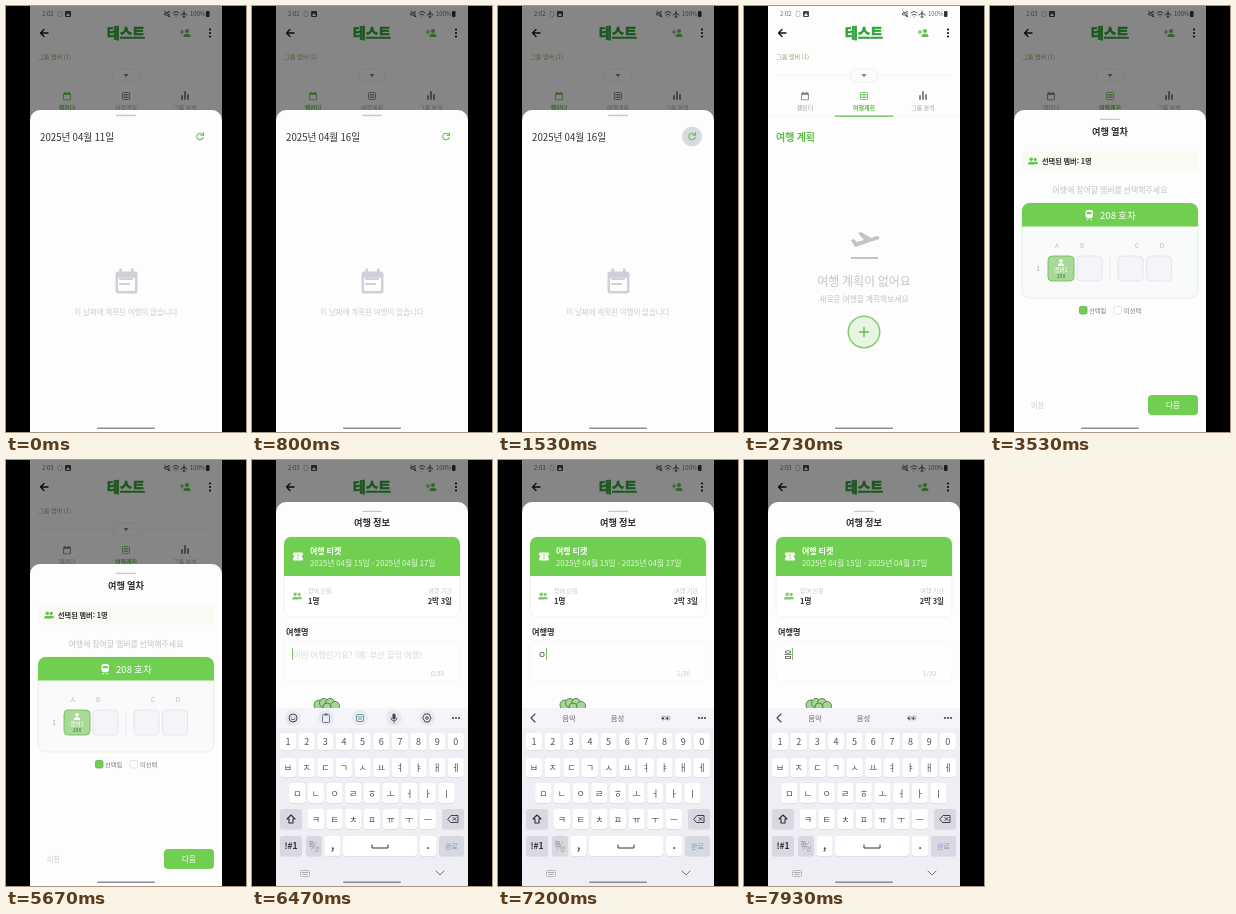
These frames come from a looping animation (240x426 px, 8 s). An HTML page with a canvas:

```html
<!DOCTYPE html>
<html lang="ko">
<head>
<meta charset="utf-8">
<style>
html, body { margin: 0; width: 100%; height: 100%; overflow: hidden; background: #000; }
canvas { display: block; width: 240px; height: 426px; }
</style>
</head>
<body>
<canvas id="stage"></canvas>
<script>
const canvas = document.getElementById('stage');
const scale = window.devicePixelRatio || 1;
canvas.width = 240 * scale;
canvas.height = 426 * scale;
const c = canvas.getContext('2d');
const FONT = '"Noto Sans CJK KR", "Noto Sans KR", "Noto Sans", sans-serif';
const GREEN = '#70cf50', INK = '#303030', PALE = '#c5c5cb', PAPER = '#fdfdfd';

const clamp = x => Math.max(0, Math.min(1, x));
const ease = (t, from, to) => 1 - (1 - clamp((t - from) / (to - from))) ** 3;

function text(s, x, y, size, color = INK, align = 'left', weight = 400) {
  c.font = `${weight} ${size}px ${FONT}`;
  c.textAlign = align;
  c.textBaseline = 'middle';
  c.fillStyle = color;
  c.fillText(s, x, y + .5);
}
function box(x, y, w, h, r, fill, stroke, dash = []) {
  c.beginPath();
  c.roundRect(x, y, w, h, r);
  if (fill) { c.fillStyle = fill; c.fill(); }
  if (stroke) {
    c.strokeStyle = stroke; c.lineWidth = .8;
    c.setLineDash(dash); c.stroke(); c.setLineDash([]);
  }
}
function disc(x, y, r, fill, stroke, width = 1) {
  c.beginPath();
  c.arc(x, y, r, 0, 7);
  if (fill) { c.fillStyle = fill; c.fill(); }
  if (stroke) { c.strokeStyle = stroke; c.lineWidth = width; c.stroke(); }
}
// Icon outline drawn relative to its centre.
function icon(x, y, d, color, width = 1, fill = false) {
  c.save();
  c.translate(x, y);
  const path = new Path2D(d);
  c.lineWidth = width;
  c.lineJoin = c.lineCap = 'round';
  c.strokeStyle = c.fillStyle = color;
  fill ? c.fill(path) : c.stroke(path);
  c.restore();
}
function person(x, y, k, color) {
  disc(x, y - 2 * k, 2 * k, color);
  box(x - 3.5 * k, y + .8 * k, 7 * k, 3.2 * k, [3 * k, 3 * k, 0, 0], color);
}
function people(x, y, color) {
  person(x + 2.2, y, .8, color);
  person(x - 1.8, y, .9, color);
}
function calendar(x, y, k, color) {
  box(x - 4 * k, y - 3.5 * k, 8 * k, 8 * k, k, color);
  box(x - 3.1 * k, y - 1.2 * k, 6.2 * k, 4.8 * k, .3 * k, PAPER);
  for (const dx of [-2.6, 1.6]) box(x + dx * k, y - 4.5 * k, k, 2 * k, 0, color);
}
const dots = (x, y, dx, dy, color) =>
  [-1, 0, 1].forEach(i => disc(x + i * dx, y + i * dy, 1.1, color));

function drawLogo() {
  text('테스트', 120, 26.5, 13.8, '#2fa336', 'center', 900);
  c.strokeStyle = '#2fa336';
  c.lineWidth = .7;
  c.strokeText('테스트', 120, 27);
}

function drawPage(t) {
  box(24, 0, 192, 426, 0, PAPER);
  text(t < 3000 ? '2:02' : '2:03', 36, 7.5, 6, '#666');
  box(52, 5.5, 4, 5, 1, null, '#777', [1, 1]);
  box(59, 5, 6, 6, 1, '#444');
  icon(62, 8, 'M-2 2L0-1L2 2Z', PAPER, 1, true);
  icon(161, 8, 'M-2-1H0L2-3V3L0 1H-2ZM-2-3L3 3', '#444', .8);
  icon(170, 8, 'M-3-1Q0-4 3-1M-2 1Q0-1 2 1M0 3V3', '#555', 1);
  icon(178, 8, 'M0-3V3M-3 1L0-1L3 1M-1 3H1', '#444', 1);
  text('100%', 184, 7.5, 6, '#666');
  box(200, 5, 3.5, 6, 1, '#333');

  icon(38, 27, 'M4 0H-3.5M0-3.5L-3.5 0L0 3.5', '#111', 1.3);
  drawLogo();
  person(181, 27, 1, '#62bd50');
  icon(176, 27, 'M-2-1H2M0-3V1', '#62bd50', 1.1);
  dots(204, 27, 0, 3.5, '#111');

  text('그룹 멤버 (1)', 32, 50.5, 6.2, '#a3a36c');
  icon(0, 69, 'M34 0H106M134 0H206', '#efeff2', .8);
  box(106.5, 63, 27, 13, 6.5, PAPER, '#e9e9ee');
  icon(120, 69.5, 'M-2.5-1.5H2.5L0 2Z', '#888', 1, true);

  const active = t < 1800 ? 0 : 1;
  const tint = i => i === active ? '#5cbd46' : '#777780';
  calendar(61, 90, .95, tint(0));
  box(116.5, 86.5, 7, 7, 1, null, tint(1));
  icon(120, 90, 'M-2-1.5H2M-2 0H2M-2 1.5H2', tint(1), .8);
  icon(179, 90, 'M-3 3V0M0 3V-4M3 3V-1', tint(2), 1.8);
  ['캘린더', '여행계획', '그룹 분석'].forEach((s, i) =>
    text(s, 61 + i * 59, 101.5, 6, i === active ? tint(i) : '#a0a0a8', 'center', i === active ? 600 : 400));
  box(24, 110.3, 192, .5, 0, '#eeeef0');
  box(32 + active * 59, 109.5, 58, 1.3, .5, '#5cbd46');

  text('여행 계획', 32, 131, 10, '#5cbd46', 'left', 700);
  icon(121, 237, 'M-14-3L-11-4L-8-1L-1-3L-7-10L-4-11L6-5L12-7Q15-7 14-4L-10 4Z', '#c2c2c8', 1, true);
  box(107, 251, 27, 2, 0, '#c2c2c8');
  text('여행 계획이 없어요', 120, 275, 12, '#c4c4cc', 'center');
  text('새로운 여행을 계획해보세요', 120, 293, 7.8, PALE, 'center');
  disc(120, 326, 15.7, t > 2950 && t < 3250 ? '#cbeac2' : '#e8f5e3', '#83cf6c', 1.5);
  icon(120, 326, 'M-4.5 0H4.5M0-4.5V4.5', '#66bd50', 1.4);
}

// Dimmed backdrop with a rounded panel; open runs from 0 to 1.
function sheet(top, open, handleY, content) {
  if (open <= 0) return;
  c.fillStyle = `rgba(0,0,0,${.47 * open})`;
  c.fillRect(24, 0, 192, 426);
  c.save();
  c.translate(0, (426 - top) * (1 - open));
  box(24, top, 192, 426 - top, [10, 10, 0, 0], PAPER);
  box(110, top + handleY, 20, 1.4, .7, '#c8c8c4');
  content();
  c.restore();
}

function drawDate(t) {
  text(`2025년 04월 ${t < 800 ? 11 : 16}일`, 34, 130.5, 9.7, INK, 'left', 500);
  const press = clamp((t - 1380) / 120) * (1 - clamp((t - 1600) / 200));
  if (press) disc(194, 130.5, 10 * press, '#d9d9e0');
  icon(194, 130.5, 'M3-1.5A3.3 3.3 0 1 0 3.2 1M3.5-4V-1.2H.7', '#66c04f', 1.1);
  calendar(120.5, 275, 2.75, '#cfcfda');
  icon(120, 275, 'M-6-2H6M-6 3H3', '#cfcfda', 2);
  text('이 날짜에 계획된 여행이 없습니다', 120, 305.5, 7.5, '#cdcdd4', 'center');
}

function drawTrain(t) {
  text('여행 열차', 120, 125, 9.2, INK, 'center', 600);
  box(32, 145, 176, 20, 5, '#f8fbf4');
  people(43, 155, '#66c04f');
  text('선택된 멤버: 1명', 52, 155, 7.2, INK, 'left', 600);
  text('여행에 참여할 멤버를 선택해주세요', 120, 183, 7.95, '#c2c2cb', 'center');

  box(32, 197, 176, 95, 8, '#f9fbfa', '#dcf0da');
  box(32, 197, 176, 23.5, [8, 8, 0, 0], GREEN);
  box(95.5, 204, 7.5, 8, 2, '#fff');
  box(96.7, 206, 5, 2.3, 0, GREEN);
  icon(99.2, 213, 'M-2.5 1L-1 0M2.5 1L1 0', '#fff', 1);
  text('208 호차', 110, 209, 9.6, '#fff', 'left', 500);
  [67, 92, 147, 172].forEach((x, i) => text('ABCD'[i], x, 239.5, 6.2, '#b9b9c2', 'center'));
  text('1', 48, 262.5, 6.5, '#a5a5ad', 'center');
  icon(120, 263, 'M0-12V12', '#e8e8ee', .8);
  for (const x of [87, 128, 156.5]) box(x, 250, 25, 25, 4, '#f5f5f9', '#e0e0e7');
  box(58, 250, 26, 25, 4, '#a9d998', '#69b852');
  person(71, 256.5, .9, '#fff');
  text('멤버1', 71, 263.5, 5.6, '#fff', 'center', 500);
  text('208', 71, 270, 5, '#476f3b', 'center');

  box(89.5, 300.5, 7.5, 7.5, 1.5, GREEN, '#5fb448');
  text('선택됨', 99, 304, 6.2, '#777');
  box(124, 300.5, 7.5, 7.5, 1.5, '#fff', '#dddde4');
  text('미선택', 134, 304, 6.2, '#777');
  text('이전', 41, 398.5, 7, PALE);
  box(158, 389, 50, 20, 4, t > 5740 && t < 5900 ? '#93db7a' : GREEN);
  text('다음', 183, 398.5, 7.5, '#fff', 'center', 500);
}

const typed = t => t < 7000 ? '' : t < 7300 ? 'ㅇ' : t < 7600 ? '으' : '음';

function drawInfo(t) {
  text('여행 정보', 120, 62, 9.2, INK, 'center', 600);
  box(32, 77, 176, 80, 7, '#fff', '#e7f3e3');
  box(32, 77, 176, 39, [7, 7, 0, 0], GREEN);
  box(41, 92.5, 10, 8, 1, '#fff');
  disc(41, 96.5, 1.3, GREEN);
  disc(51, 96.5, 1.3, GREEN);
  icon(46, 96.5, 'M0-2.5V2.5', GREEN, .8);
  text('여행 티켓', 58, 90, 8, '#fff', 'left', 600);
  text('2025년 04월 15일 - 2025년 04월 17일', 58, 103, 7.8, '#e3f6dc');
  people(45, 136, '#83ca6d');
  text('참여 인원', 56, 130.5, 6.1, PALE);
  text('1명', 56, 140.5, 7.5, INK, 'left', 600);
  text('여행 기간', 200, 130.5, 6.1, PALE, 'right');
  text('2박 3일', 200, 140.5, 7.5, INK, 'right', 600);

  text('여행명', 34, 171.5, 8.2, INK, 'left', 600);
  box(32, 182, 176, 39, 5, '#fefefe', '#ededf1', [2, 2]);
  const word = typed(t);
  if (word) text(word, 40, 194, 8.8, INK);
  else text('어떤 여행인가요? (예: 부산 힐링 여행)', 41, 194, 8.4, '#d8d8de');
  if (word || (t - 6350) % 1000 < 500) box(word ? 48 : 40, 188, .9, 12, 0, '#70b95a');
  text(`${word.length}/30`, 192, 213.5, 6.3, '#c6c6cd', 'right');

  for (const [x, y, r] of [[67, 245, 5], [72, 243, 4.5], [78, 243, 4.5], [83, 246, 4.5], [75, 247, 4]])
    disc(x, y, r, '#a5d695', '#4b7f45', .9);
}

function drawToolbar(word) {
  const ink = '#45454b';
  if (word) {
    icon(35, 258, 'M2-4L-2 0L2 4', ink, 1.1);
    text('음악', 71, 258, 7.3, '#66666e', 'center');
    text('음성', 119.5, 258, 7.3, '#66666e', 'center');
    for (const x of [165.5, 170]) {
      disc(x, 258, 2, '#fff', '#777', .6);
      disc(x - .5, 258.3, 1.1, '#333');
    }
  } else {
    for (const x of [41, 74, 108, 142, 175]) disc(x, 258, 8, '#e9e9f1');
    disc(41, 258, 4, null, ink);
    icon(41, 258, 'M-1.5-1V-1M1.5-1V-1M-2 1Q0 3 2 1', ink, .9);
    box(70.5, 254.5, 7, 8, 1, null, '#55607a');
    box(72.5, 253.5, 3, 2, 0, '#55607a');
    box(104.5, 254.5, 7, 7, 1.5, null, '#438b8b');
    icon(108, 258, 'M-1.5-1H1.5M-1.5 1H1.5', '#438b8b', .8);
    box(140.4, 253.5, 3.2, 6, 1.6, ink);
    icon(142, 258, 'M-3 0Q-3 3 0 3Q3 3 3 0M0 3V5', ink, .8);
    icon(175, 258, 'M-2-4H2L4 0L2 4H-2L-4 0Z', ink);
    disc(175, 258, 1.3, null, ink);
  }
  dots(204, 258, 3, 0, ink);
}

function drawKeyboard(t) {
  const open = ease(t, 6120, 6380);
  if (!open) return;
  c.save();
  c.translate(0, 178 * (1 - open));
  box(24, 248, 192, 20, 0, '#f5f5f9');
  box(24, 268, 192, 158, 0, '#eeeef4');
  drawToolbar(typed(t));

  const strokes = { 'ㅇ': 7000, 'ㅡ': 7300, 'ㅁ': 7600 };
  const key = (x, y, w, h, fill = '#fff') => {
    box(x, y + .8, w, h, 3, '#d9d9e2');
    box(x, y, w, h, 3, fill);
  };
  const row = (letters, x, y, h) => [...letters].forEach((s, i) => {
    const cx = x + i * 18.65;
    const held = t >= strokes[s] - 60 && t < strokes[s] + 90;
    key(cx - 8, y, 16, h, held ? '#cfcfda' : '#fff');
    text(s, cx, y + h / 2, 9, '#505058', 'center');
  });
  row('1234567890', 36, 273, 17);
  row('ㅂㅈㄷㄱㅅㅛㅕㅑㅐㅔ', 36, 298, 19);
  row('ㅁㄴㅇㄹㅎㅗㅓㅏㅣ', 45.3, 323, 20);
  row('ㅋㅌㅊㅍㅠㅜㅡ', 64, 349, 20);

  const shade = '#d8d8e0';
  key(28, 349, 22, 20, shade);
  icon(39, 359, 'M0-4L4 0H2V4H-2V0H-4Z', INK, 1.1);
  key(190, 349, 22, 20, shade);
  icon(201, 359, 'M-5 0L-2-3.5H5V3.5H-2ZM0-1.5L3 1.5M3-1.5L0 1.5', INK, .9);
  key(28, 376, 22, 20, shade);
  text('!#1', 39, 385.5, 8.5, INK, 'center', 600);
  key(54, 376, 16, 20, shade);
  text('한', 59.5, 383, 6, '#666', 'center');
  text('영', 64.5, 388.5, 6, '#999', 'center');
  icon(62, 386, 'M-3 4L3-4', '#999', .6);
  key(72.5, 376, 16, 20);
  text(',', 80.5, 385, 10, INK, 'center', 600);
  key(91, 376, 74, 20);
  icon(128, 386, 'M-8-1V2H8V-1', INK);
  key(168, 376, 16, 20);
  text('.', 176, 385, 10, INK, 'center', 600);
  key(187, 376, 25, 20, shade);
  text('완료', 199.5, 385.5, 7, '#7897d6', 'center');

  box(48.5, 410.5, 9, 6, 1, null, '#aaaab2');
  icon(53, 413.5, 'M-3-1H3M-2 1H2', '#aaaab2', 1);
  icon(188, 413, 'M-4-2L0 2L4-2', '#77777f', 1);
  c.restore();
}

function draw(t) {
  c.setTransform(scale, 0, 0, scale, 0, 0);
  c.fillStyle = '#000';
  c.fillRect(0, 0, 240, 426);
  c.save();
  c.beginPath();
  c.rect(24, 0, 192, 426);
  c.clip();
  drawPage(t);
  sheet(104, 1 - ease(t, 1950, 2250), 4.8, () => drawDate(t));
  const top = 104 - 62 * ease(t, 5900, 6120);
  sheet(top, ease(t, 3150, 3450), 8.7, () => {
    if (t < 5900) return drawTrain(t);
    c.translate(0, top - 42);
    drawInfo(t);
  });
  drawKeyboard(t);
  box(91, 421.4, 58, 1.6, .8, '#8d8d96');
  c.restore();
}

const start = performance.now();
function loop(now) {
  draw(Math.max(0, now - start) % 8000);
  requestAnimationFrame(loop);
}
draw(0);
requestAnimationFrame(loop);
</script>
</body>
</html>
```
